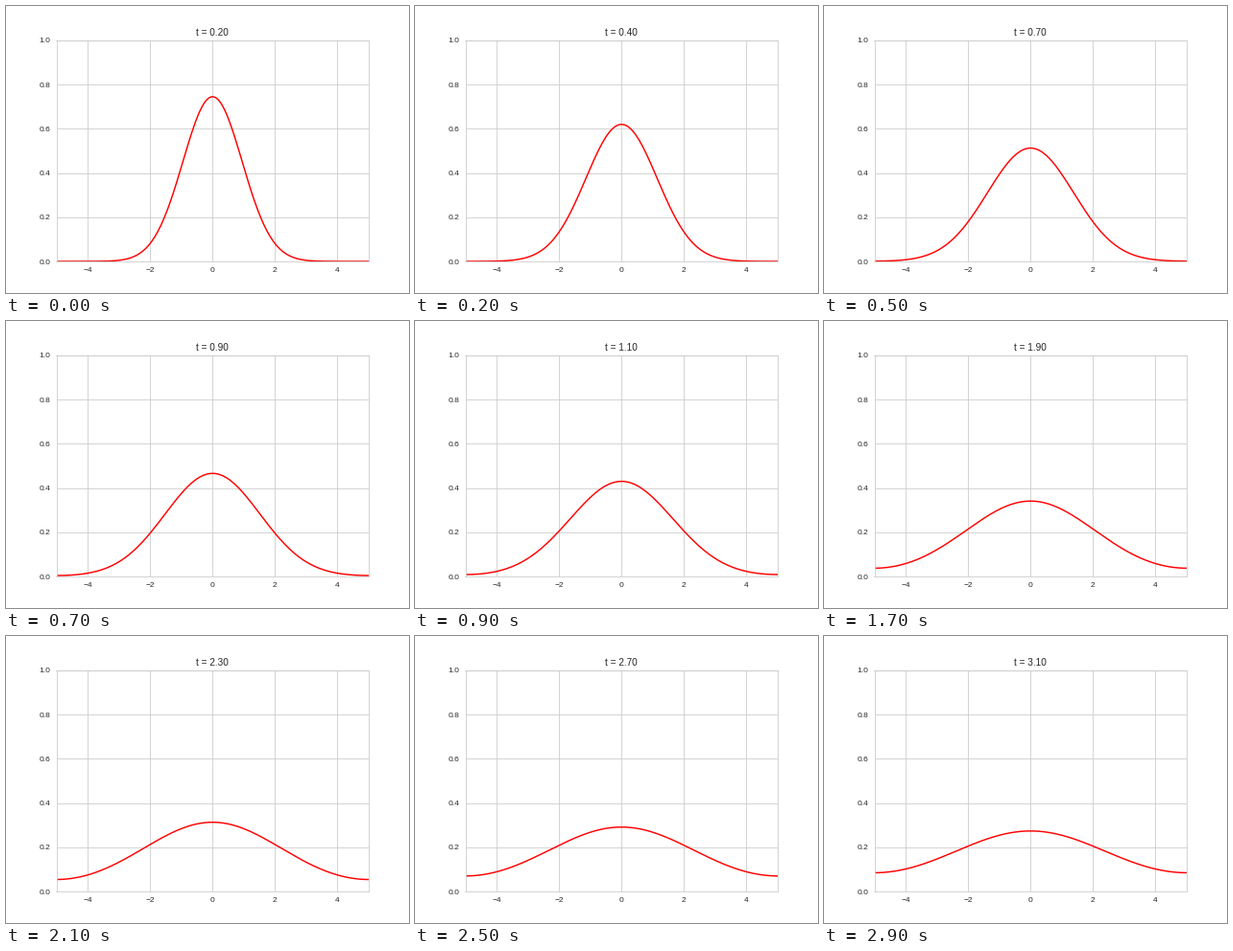
Recreate the animation shown at these times as a matplotlib script. Size 420 by 300 pixels, loop 3000 ms.

```python
import numpy as np
import matplotlib.pyplot as plt
from matplotlib.animation import FuncAnimation

FRAMES, INTERVAL = 30, 100
START, STEP = 0.2, 0.1
HALF = 5  # the domain is [-HALF, HALF] with reflecting ends

plt.rcParams.update({
    "font.family": "Liberation Sans",
    "text.color": "0.15",
    "axes.edgecolor": "0.8",
    "axes.linewidth": 1,
    "axes.axisbelow": True,
    "axes.grid": True,
    "grid.color": "0.8",
    "grid.linewidth": 1,
    "axes.titlesize": 12,
    "axes.titlepad": 6,
})


def heat(x, t):
    """Diffusing Gaussian, with mirror images for the closed ends."""
    spread = 1 + 4 * t
    centres = 2 * HALF * np.arange(-2, 3)
    bumps = np.exp(-(x[:, None] - centres) ** 2 / spread)
    return bumps.sum(axis=1) / np.sqrt(spread)


x = np.linspace(-HALF, HALF, 201)
fig, ax = plt.subplots(figsize=(7, 5), dpi=60, facecolor="white")
ax.set_position([0.125, 0.11, 0.775, 0.77])
ax.set(xlim=(-HALF, HALF), ylim=(0, 1),
       xticks=range(-4, 5, 2), yticks=np.linspace(0, 1, 6))
ax.tick_params(length=0, pad=7, labelsize=10, labelcolor="0.15")
curve, = ax.plot(x, heat(x, START), color="red", lw=1.75,
                 solid_capstyle="round")
title = ax.set_title("")


def update(i):
    t = START + STEP * i
    curve.set_ydata(heat(x, t))
    title.set_text(f"t = {t:.2f}")
    return curve, title


anim = FuncAnimation(fig, update, frames=FRAMES, interval=INTERVAL,
                     repeat=True, repeat_delay=0)
plt.show()
```
